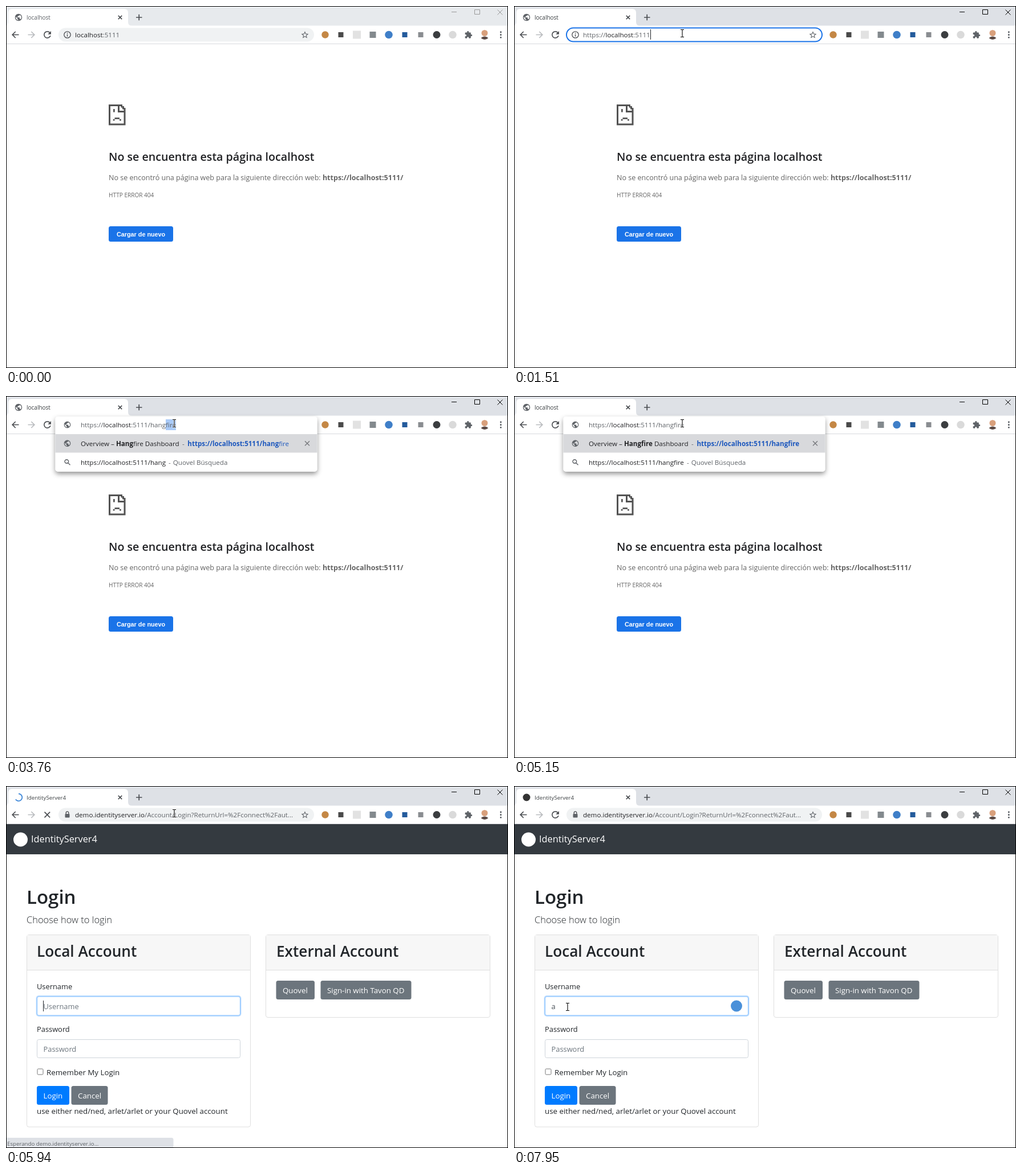
Recreate the animation shown at these times as an HTML page. Size 880 by 636 pixels, loop 8 s.

```html
<!DOCTYPE html>
<html lang="es">
<head>
<meta charset="utf-8">
<title>Browser login</title>
<style>
html, body { margin: 0; width: 100%; height: 100%; overflow: hidden; background: #fff }
svg { display: block; font: 13.3px "Open Sans", "Noto Sans", sans-serif; fill: #212529 }
text { white-space: pre }
.line { fill: none; stroke: #4a4d51; stroke-width: 1.7 }
.icon { fill: #5f6368 }
.thin { fill: none; stroke: #000; stroke-width: 1 }
.omni { font-size: 11.6px; fill: #202124 }
.grey { fill: #5f6368 }
.blue { fill: #1c57bd }
.strip { fill: #dee1e6 }
.idle .strip { fill: #e7eaed }
.idle .thin { stroke: #999 }
.idle .title { fill: #5f6368 }
.title { font-size: 10px; fill: #3c4043 }
.card { fill: #fff; stroke: #dfdfdf }
.head { font-weight: 600 }
.b { font-weight: 700 }
.small { font-size: 12.85px }
.hint { fill: #6c757d }
.white { fill: #fff }
</style>
</head>
<body>
<svg id="stage" width="880" height="636" viewBox="0 0 880 636">
  <defs>
    <path id="globe" transform="translate(-12 -12)" d="M12 2C6.48 2 2 6.48 2 12s4.48 10 10 10 10-4.48 10-10S17.52 2 12 2zm-1 17.93c-3.95-.49-7-3.85-7-7.93 0-.62.08-1.21.21-1.79L9 15v1c0 1.1.9 2 2 2v1.93zm6.9-2.54c-.26-.81-1-1.39-1.9-1.39h-1v-3c0-.55-.45-1-1-1H8v-2h2c.55 0 1-.45 1-1V7h2c1.1 0 2-.9 2-2v-.41c2.93 1.19 5 4.06 5 7.41 0 2.08-.8 3.97-2.1 5.39z"/>
    <path id="beam" d="M-3 -6.5h2.2L0 -6l.8-.5H3M0 -6V6M-3 6.5h2.2L0 6l.8.5H3"/>
    <filter id="shadow" x="-10%" y="-20%" width="120%" height="150%">
      <feDropShadow dx="0" dy="4" stdDeviation="4" flood-opacity=".42"/>
    </filter>
    <clipPath id="face"><circle cx="839" cy="50.5" r="8.5"/></clipPath>
  </defs>
  <rect width="880" height="636" class="white"/>

  <g id="error">
    <g fill="#535353">
      <path fill-rule="evenodd" d="M180 173h24v3h3v3h2.500v30.500H180zM183 176v30.500h23.500V187H196V176zM199 176v8h7.500v-2.500h-2.500v-3h-2.500V176z"/>
      <path d="M188 181h2.700v5.500H188zM190.500 196h8.500v2.700h-8.500zM187.700 198.700h2.800v2.700h-2.800zM199 198.700h2.800v2.700H199z"/>
    </g>
    <text x="180" y="271.500" class="head" font-size="19.65" fill="#202124">No se encuentra esta página localhost</text>
    <g fill="#646464">
      <text x="180" y="305.600" font-size="12.52">No se encontró una página web para la siguiente dirección web: <tspan class="b">https://localhost:5111/</tspan></text>
      <text x="180" y="336.200" font-size="10.05">HTTP ERROR 404</text>
    </g>
    <rect x="180" y="387" width="113" height="27" rx="3.500" fill="#1a73e8"/>
    <text x="194" y="404.600" class="white b" style="font-family:'Liberation Sans',sans-serif" font-size="10.8">Cargar de nuevo</text>
  </g>

  <g id="login">
    <rect y="67" width="880" height="53" fill="#343a40"/>
    <circle cx="25.500" cy="94" r="12.500" class="white"/>
    <text x="44" y="98.700" class="white" font-size="16.35">IdentityServer4</text>
    <text x="36" y="207" class="head" font-size="33">Login</text>
    <text x="36" y="241" font-weight="300" font-size="16.45">Choose how to login</text>
    <rect x="36.500" y="261.500" width="392" height="337.500" rx="3.500" class="card"/>
    <rect x="455.500" y="261.500" width="393" height="145" rx="3.500" class="card"/>
    <path d="M37 262h391v61H37zM456 262h392v61H456z" fill="#f7f7f7"/>
    <path d="M36 323.500h392M456 323.500h392" stroke="#dfdfdf"/>
    <text x="54" y="300" class="head" font-size="26.2">Local Account</text>
    <text x="474" y="300" class="head" font-size="26.2">External Account</text>
    <text x="54" y="357.300" class="small">Username</text>
    <rect x="52.500" y="368" width="360" height="37" rx="5" fill="#bfdeff"/>
    <rect x="54.500" y="370" width="356" height="33" rx="3" fill="#fff" stroke="#80bdff"/>
    <text id="user" x="65.500" y="392" class="small"></text>
    <rect id="fieldCaret" y="377" width="1" height="19"/>
    <circle id="helper" cx="390" cy="386.500" r="10" fill="#4a90d9"/>
    <text x="54" y="432.400" class="small">Password</text>
    <rect x="54.500" y="445.500" width="356" height="32" rx="3" fill="#fff" stroke="#ced4da"/>
    <text x="65.500" y="467.300" class="small hint">Password</text>
    <rect x="55" y="497" width="10" height="10" rx="1.500" fill="#fff" stroke="#767676"/>
    <text x="71" y="507.700">Remember My Login</text>
    <rect x="54" y="527" width="57" height="33" rx="3.500" fill="#007bff"/>
    <g class="hint">
      <rect x="114.500" y="527" width="64" height="33" rx="3.500"/>
      <rect x="473.500" y="342" width="67.500" height="33" rx="3.500"/>
      <rect x="551.500" y="342" width="159" height="33" rx="3.500"/>
    </g>
    <g class="white">
      <text x="65.500" y="548.800">Login</text>
      <text x="126" y="548.800">Cancel</text>
      <text x="485" y="363.700">Quovel</text>
      <text x="563" y="363.700">Sign-in with Tavon QD</text>
    </g>
    <text x="54" y="575.800">use either ned/ned, arlet/arlet or your Quovel account</text>
  </g>

  <g id="status">
    <path d="M1 618h289q3.500 0 3.500 3.500V635H1z" fill="#dee1e6"/>
    <text x="2" y="631.700" font-size="9.7" class="grey">Esperando demo.identityserver.io...</text>
  </g>

  <rect width="880" height="35" class="strip"/>
  <path d="M-3 35q7 0 7-7V12q0-7 7-7H207q7 0 7 7v16q0 7 7 7V67H880V35z" class="white"/>
  <rect y="34.500" width="880" height="32" class="white"/>
  <rect y="66" width="880" height="1" fill="#d8dadd"/>
  <use id="favicon" href="#globe" class="icon" transform="translate(22 20) scale(.62)"/>
  <circle id="siteIcon" cx="22" cy="20" r="6.500" fill="#333"/>
  <path id="spinner" fill="none" stroke-width="1.700"/>
  <text id="title" x="36" y="23.700" class="title"></text>
  <path class="line" stroke-width="1.500" d="M196.800 16.800l6.400 6.400m0-6.400l-6.400 6.400M228 20h10.500M233.200 14.800v10.500"/>
  <path class="thin" d="M781 10.500h9M821.500 6.500h9v8h-9zM861.500 6.500l9 9m0-9l-9 9"/>

  <path class="line" d="M22.500 50.500H11.500M16.700 45l-5.500 5.500 5.500 5.500"/>
  <path class="line" style="stroke:#b9bbbe" d="M38.500 50.500H49.500M44.300 45l5.500 5.500-5.500 5.500"/>
  <path id="reload" fill="#4a4d51" transform="translate(62.900 40.900) scale(.8)" d="M17.650 6.350C16.200 4.900 14.210 4 12 4c-4.420 0-7.990 3.580-7.990 8s3.570 8 7.990 8c3.730 0 6.840-2.550 7.730-6h-2.080c-.82 2.330-3.040 4-5.650 4-3.310 0-6-2.690-6-6s2.690-6 6-6c1.660 0 3.140.69 4.220 1.780L13 11h7V4l-2.350 2.350z"/>
  <path id="stop" class="line" d="M67.500 45.700l9.600 9.600m0-9.600l-9.600 9.600"/>
  <g id="extensions"></g>
  <path class="icon" transform="translate(803.500 43.500) scale(.6)" d="M20.500 11H19V7c0-1.100-.9-2-2-2h-4V3.500C13 2.120 11.880 1 10.500 1S8 2.120 8 3.500V5H4c-1.100 0-1.990.9-1.990 2v3.800H3.500c1.490 0 2.700 1.210 2.700 2.700s-1.210 2.700-2.700 2.700H2V20c0 1.100.9 2 2 2h3.800v-1.500c0-1.490 1.210-2.700 2.700-2.700s2.700 1.210 2.700 2.700V22H17c1.100 0 2-.9 2-2v-4h1.500c1.380 0 2.500-1.120 2.500-2.500S21.880 11 20.500 11z"/>
  <g clip-path="url(#face)">
    <circle cx="839" cy="47.500" r="5.500" fill="#d9a07c"/>
    <ellipse cx="839" cy="59" rx="7" ry="5.500" fill="#5b4a45"/>
  </g>
  <path class="icon" d="M866 44.500h2.700v2.700H866zM866 49.200h2.700v2.700H866zM866 53.900h2.700v2.700H866z"/>

  <rect id="pill" x="92" y="38.500" width="448" height="24" rx="12" stroke-width="2"/>
  <path class="icon" transform="translate(516.300 43) scale(.64)" d="M22 9.240l-7.190-.62L12 2 9.190 8.630 2 9.240l5.460 4.730L5.820 21 12 17.270 18.180 21l-1.630-7.030L22 9.240zM12 15.400l-3.760 2.270 1-4.280-3.320-2.880 4.380-.38L12 6.100l1.710 4.040 4.380.38-3.320 2.880 1 4.280L12 15.400z"/>
  <path id="info" class="line" style="stroke-width:1.300" d="M101.800 50.500a5.700 5.700 0 1 0 11.400 0a5.700 5.700 0 1 0 -11.400 0M107.500 49.800v4M107.500 47v1.500"/>
  <g id="lock">
    <rect x="103.500" y="49" width="8" height="6.500" rx="1" class="icon"/>
    <path class="line" style="stroke-width:1.300" d="M105.200 49v-1.800a2.300 2.300 0 0 1 4.600 0V49"/>
  </g>

  <g id="popup">
    <rect id="sheet" x="86.500" y="36" width="459" rx="5" class="white" filter="url(#shadow)"/>
    <use href="#globe" class="icon" transform="translate(107.500 50.500) scale(.58)"/>
    <g id="rows" class="omni">
      <rect x="86.500" y="67" width="459" height="32.500" fill="#d8d9dc"/>
      <use href="#globe" class="icon" transform="translate(107.500 83.300) scale(.58)"/>
      <path class="line" style="stroke:#77797d;stroke-width:1.400" d="M524 79.300l8 8m0-8l-8 8"/>
      <text x="131" y="87.500">Overview – <tspan id="nameHit" class="b"></tspan><tspan id="nameRest"></tspan> Dashboard<tspan dx="2.500" class="grey"> - </tspan><tspan dx="2.500" id="linkHit" class="blue b"></tspan><tspan id="linkRest" class="blue"></tspan></text>
      <path class="line" style="stroke:#5f6368;stroke-width:1.400" d="M103 115a3.300 3.300 0 1 0 6.600 0a3.300 3.300 0 1 0 -6.600 0M108.700 117.500l3.800 3.800"/>
      <text x="131" y="120.700"><tspan id="query"></tspan><tspan class="grey" dx="2"> - <tspan dx="1">Quovel Búsqueda</tspan></tspan></text>
      <g id="third">
        <use href="#globe" class="icon" transform="translate(107.500 149.500) scale(.58)"/>
        <text x="131" y="153.700" class="blue"><tspan class="b">https</tspan>://demo.identityserver.io/connect/authorize?client_id=interactive.co...</text>
      </g>
    </g>
  </g>

  <rect id="selection" y="41" height="19" fill="#a9caf8"/>
  <text id="url" y="54.800" class="omni"><tspan id="scheme" class="grey"></tspan><tspan id="host"></tspan><tspan id="path" class="grey"></tspan></text>
  <rect id="caret" y="41" width="1" height="18"/>

  <g id="mouse">
    <g id="ibeam" fill="none">
      <use href="#beam" stroke="#fff" stroke-width="2.600"/>
      <use href="#beam" stroke="#000" stroke-width="1.100"/>
    </g>
    <path id="arrow" fill="#fff" stroke="#000" stroke-width=".9" d="M0 0V15l3.400-3.200 2.300 5.200 2.200-1-2.200-5H10.500z"/>
  </g>
  <rect x=".5" y=".5" width="879" height="635" fill="none" stroke="#000"/>
</svg>
<script>
const LOOP = 8000;
const ACTIVE = 960, UNFOLD = 1430, OPEN = 2520, ENTER = 5320, COMMIT = 5870, DONE = 6330, TYPED = 7400;
const KEYS = [3130, 3210, 3360, 3760, 4070, 4300, 4450, 4600];
const BASE = 'https://localhost:5111/', WORD = 'hangfire';
// start, end, steps, target x, target y
const MOVES = [
  [190, 910, 9, 226.5, 61],
  [973, 1510, 7, 295, 48],
  [6484, 6940, 6, 91, 386],
  [7010, 7170, 2, 94, 388]
];
// x, colour, radius, round
const EXTENSIONS = [
  [559.5, '#c48745', 6.2, 1], [587, '#4a4a4a', 4.5], [615, '#e2e2e2', 7], [643, '#83898d', 5.5],
  [671, '#3f7fc8', 6.8, 1], [699, '#245b9c', 4.5], [727, '#8a8d91', 4.5], [755, '#3b3d40', 6.5, 1],
  [783, '#dadada', 6.8, 1]
];

const $ = id => document.getElementById(id);
const set = (id, attrs) => { for (const k in attrs) $(id).setAttribute(k, attrs[k]); };
const show = (id, on) => set(id, { visibility: on ? 'visible' : 'hidden' });
const write = (id, s) => { if ($(id).textContent !== s) $(id).textContent = s; };

$('extensions').innerHTML = EXTENSIONS.map(([x, fill, r, round]) =>
  `<rect x="${x - r}" y="${50.5 - r}" width="${2 * r}" height="${2 * r}" rx="${round ? r : 0}" fill="${fill}"/>`).join('');

function arc(from, sweep) {
  const point = deg => {
    const a = deg * Math.PI / 180;
    return `${22 + 6.3 * Math.cos(a)} ${20 + 6.3 * Math.sin(a)}`;
  };
  return `M${point(from)}A6.3 6.3 0 ${sweep > 180 ? 1 : 0} 1 ${point(from + sweep)}`;
}

function mouseAt(t) {
  let x = 400, y = 596;
  for (const [start, end, steps, toX, toY] of MOVES) {
    const raw = Math.floor((t - start) / (end - start) * steps + 1e-6) / steps;
    const k = Math.min(1, Math.max(0, raw)), e = k * k * (3 - 2 * k);
    x += (toX - x) * e;
    y += (toY - y) * e;
  }
  return [x, y];
}

function address(t) {
  if (t < UNFOLD) return ['', 'localhost', ':5111'];
  if (t < OPEN) return ['https://', 'localhost', ':5111'];
  if (t < ENTER) return ['https://', 'localhost', ':5111/' + WORD];
  if (t < COMMIT) return ['', 'localhost', ':5111/' + WORD];
  return ['', 'demo.identityserver.io', '/Account/Login?ReturnUrl=%2Fconnect%2Faut...'];
}

function drawOmnibox(t, within) {
  const open = within(OPEN, ENTER), focused = within(ACTIVE, OPEN);
  const typed = KEYS.filter(k => t >= k).length;
  const left = open ? 131 : 121, parts = address(t), url = $('url');
  ['scheme', 'host', 'path'].forEach((id, i) => write(id, parts[i]));
  set('url', { x: left });
  set('pill', { fill: focused ? '#fff' : '#f0f2f3', stroke: focused ? '#1a73e8' : 'none' });
  show('info', t < OPEN || within(ENTER, COMMIT));
  show('lock', t >= COMMIT);

  $('popup').style.display = open ? '' : 'none';
  $('third').style.display = typed ? 'none' : '';
  set('sheet', { height: typed ? 97 : 130 });
  set('rows', { opacity: t < OPEN + 80 ? 0.6 : 1 });
  write('nameHit', 'Hangfire'.slice(0, typed));
  write('nameRest', 'Hangfire'.slice(typed));
  write('linkHit', BASE + WORD.slice(0, typed));
  write('linkRest', WORD.slice(typed));
  write('query', BASE + WORD.slice(0, typed));

  const all = within(ACTIVE, UNFOLD), marked = all || open && typed < WORD.length;
  const full = url.getComputedTextLength();
  const skip = all ? 0 : BASE.length + typed;
  const from = marked && skip ? url.getSubStringLength(0, skip) : 0;
  show('selection', marked);
  set('selection', { x: left + from, width: full - from });
  show('caret', within(UNFOLD, 1980) || within(4600, 5150));
  set('caret', { x: Math.round(left + full) });
}

function drawTab(t, within) {
  const waiting = within(ENTER, COMMIT), loading = within(COMMIT, DONE);
  show('favicon', t < ENTER);
  show('siteIcon', t >= DONE);
  show('spinner', waiting || loading);
  set('spinner', waiting
    ? { d: arc(190 - (t - 5620) * 0.36, 80), stroke: '#9a9da1' }
    : { d: arc((t - 5940) * 0.36 - 90, 235), stroke: '#3d87d9' });
  write('title', t < COMMIT ? 'localhost' : 'IdentityServer4');
  $('title').style.fontSize = t < COMMIT ? '10px' : '9.75px';
  const busy = within(ENTER, 6400);
  show('stop', busy);
  show('reload', !busy);
  show('status', within(5470, 6250));
}

function drawForm(t, within) {
  const done = t >= TYPED;
  show('error', t < COMMIT);
  show('login', t >= COMMIT);
  write('user', done ? 'a' : 'Username');
  set('user', { fill: done ? '#495057' : '#6c757d' });
  show('helper', t >= 6640);
  show('fieldCaret', within(COMMIT, 6370) || within(6870, 7950));
  set('fieldCaret', { x: done ? 72 : 65 });
}

function drawMouse(t) {
  const [x, y] = mouseAt(t);
  const overText = y < 67 || t > COMMIT && y > 368 && y < 405;
  set('mouse', { transform: `translate(${x} ${y})` });
  show('ibeam', t >= 190 && overText);
  show('arrow', t >= 190 && !overText);
}

function frame() {
  const t = performance.now() % LOOP;
  const within = (a, b) => t >= a && t < b;
  $('stage').classList.toggle('idle', t < ACTIVE);
  drawOmnibox(t, within);
  drawTab(t, within);
  drawForm(t, within);
  drawMouse(t);
  requestAnimationFrame(frame);
}
frame();
</script>
</body>
</html>
```
